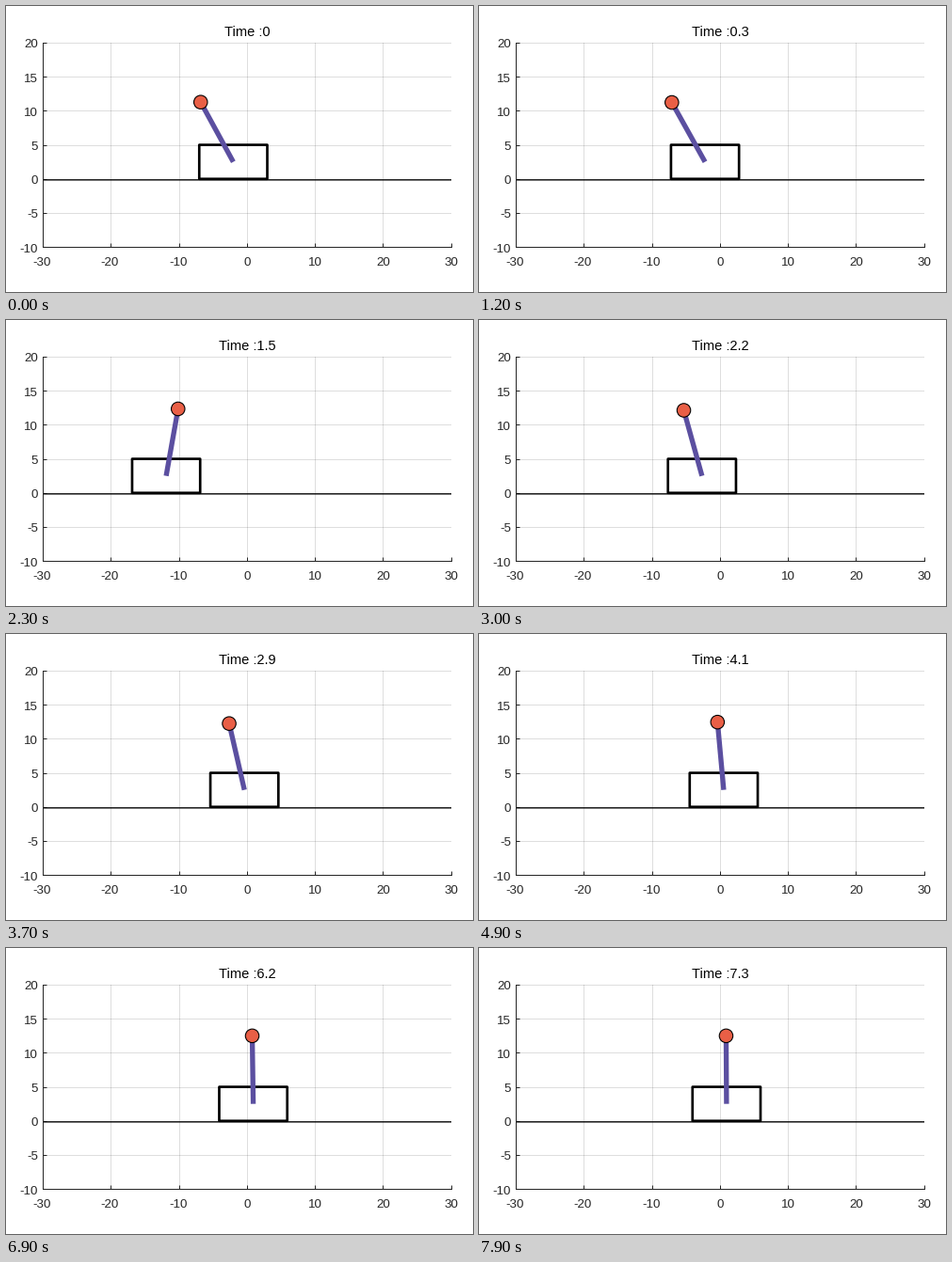
A matplotlib script for the animation above (8 s loop, 496 px wide and 304 px high).

```python
import numpy as np
import matplotlib.pyplot as plt
from matplotlib.animation import FuncAnimation
from matplotlib.patches import Circle, Rectangle

W, H, DPI = 496, 304, 96
LEFT, RIGHT, TOP, BOTTOM = 39.1, 472.6, 39.1, 256.1
FRAMES, STEP = 80, 100
POLE, CART_W, CART_H = 10, 10, 5
DARK = "#262626"

plt.rcParams["font.family"] = "Liberation Sans"


def pt(px):
    return px * 72 / DPI


def clock(k):
    """Solver time: tiny steps at first, then even ones."""
    return 0.1036 * np.log1p(np.exp(k - 8.95))


def pose(t):
    """Cart position and pole tilt: a free fall handed over to the controller."""
    gate = 1 / (1 + np.exp(-14 * (t - 0.64)))
    slow = np.exp(-0.9 * t)
    swing = 11.65 * np.exp(-(t - 0.97) ** 2 / 0.61)
    x = -2 + gate * (3 - 18.36 * slow - swing)
    lean = 24.45 * np.exp(-2.03 * t) - 4.06 * slow
    tilt = -0.5 * np.cosh(t) * (1 - gate) + gate * 0.95 * np.tanh(lean / 0.95)
    return x, tilt


fig = plt.figure(figsize=(W / DPI, H / DPI), dpi=DPI, facecolor="white")
ax = fig.add_axes([LEFT / W, 1 - BOTTOM / H, (RIGHT - LEFT) / W,
                   (BOTTOM - TOP) / H])
ax.set(xlim=(-30, 30), ylim=(-10, 20),
       xticks=range(-30, 31, 10), yticks=range(-10, 21, 5))
ax.set_axisbelow(True)
ax.grid(color=DARK, alpha=0.15, lw=pt(1))
ax.tick_params(direction="in", length=pt(4.3), width=pt(1), color=DARK,
               labelbottom=False, labelleft=False)
ax.spines[["top", "right"]].set_visible(False)
for side in ("left", "bottom"):
    ax.spines[side].set(color=DARK, linewidth=pt(1))


def label(x, y, text, size, color, ha="center"):
    return fig.text(x / W, 1 - y / H, text, fontsize=size, color=color,
                    ha=ha, va="baseline")


for v in range(-30, 31, 10):
    px = LEFT + (v + 30) / 60 * (RIGHT - LEFT)
    label(px - (v < 0), 275.5, str(v), 10, DARK)
for v in range(-10, 21, 5):
    py = BOTTOM - (v + 10) / 30 * (BOTTOM - TOP)
    label(34, py + 5.4, str(v), 10, DARK, "right")

title = label(256, 32, "", 11, "black")

ax.plot([-30, 30], [-0.15, -0.15], color="black", lw=pt(1.35), snap=False)
cart = ax.add_patch(Rectangle((0, 0), CART_W, CART_H, fill=False, ec="black",
                              lw=pt(2.67), joinstyle="round", snap=False,
                              zorder=3))
rod, = ax.plot([], [], color="#5b4fa0", lw=pt(5.33), solid_capstyle="butt",
               zorder=4)
bob = ax.add_patch(Circle((0, 0), 1, fc="#e95f46", ec="black", lw=pt(1.1),
                          zorder=5))


def draw(k):
    t = clock(k)
    x, tilt = pose(t)
    y = CART_H / 2
    tip_x, tip_y = x + POLE * np.sin(tilt), y + POLE * np.cos(tilt)
    cart.set_x(x - CART_W / 2)
    rod.set_data([x, tip_x], [y, tip_y])
    bob.center = tip_x, tip_y
    title.set_text(f"Time :{round(float(t), 1):g}")
    return cart, rod, bob, title


anim = FuncAnimation(fig, draw, frames=FRAMES, interval=STEP, repeat=True,
                     repeat_delay=0, blit=False)
plt.show()
```
